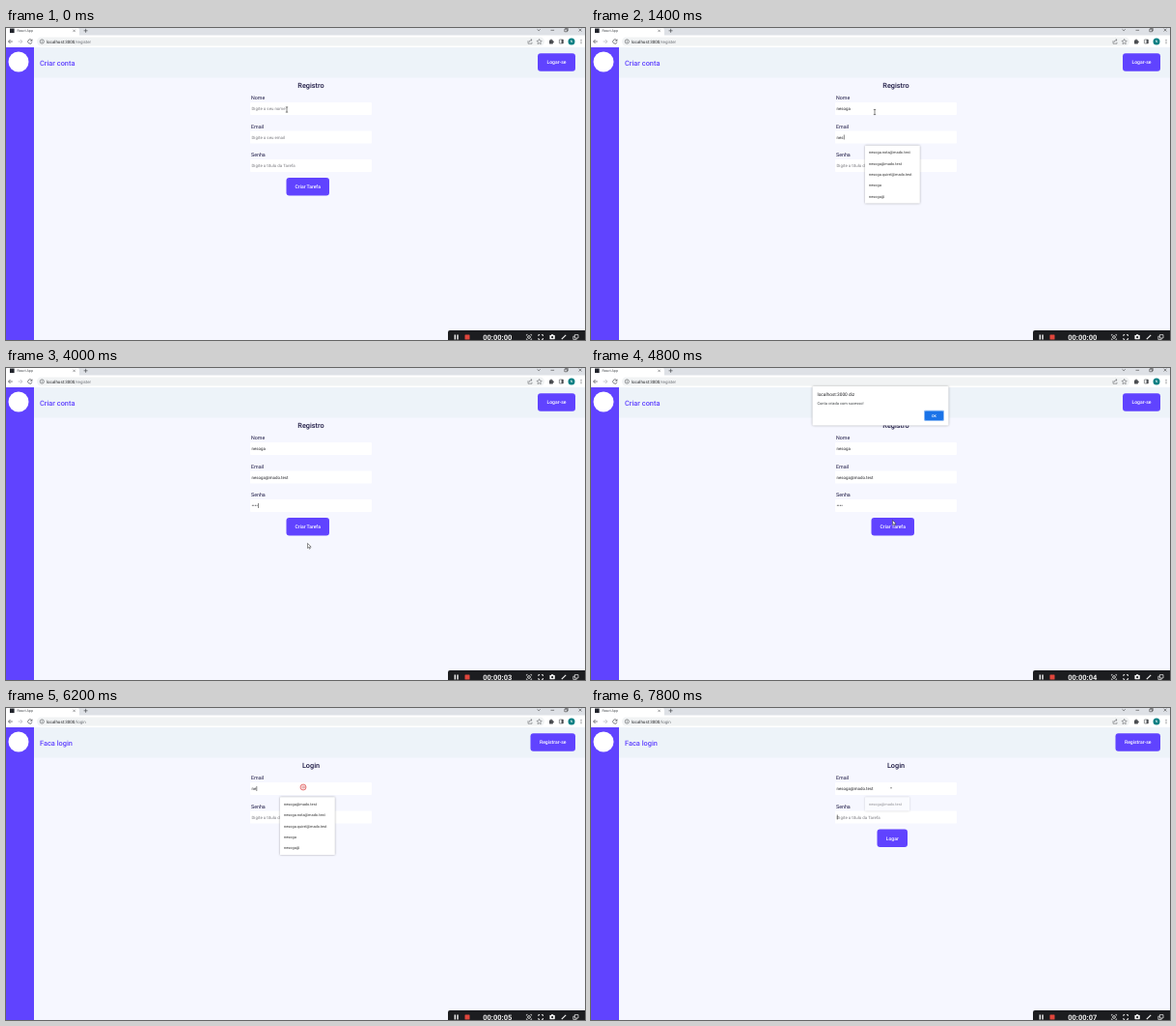
Animation of 600 by 323 pixels, one loop 8 s. Source, as an HTML page:

```html
<!DOCTYPE html>
<html lang="pt">
<head>
<meta charset="utf-8">
<title>Criar conta</title>
<style>
  html, body { margin: 0; width: 100%; height: 100%; overflow: hidden; background: #f6f7ff; }
  svg { display: block; width: 100vw; height: 100vh; }
  text { font-family: Roboto, sans-serif; text-rendering: geometricPrecision; white-space: pre; }
  .shadow { filter: drop-shadow(0 .6px 1px #0005); }
</style>
</head>
<body>
<svg id="stage" viewBox="0 0 600 323" preserveAspectRatio="none"></svg>
<script>
const LOOP = 8000, STEP = 200;
const PURPLE = '#6043ff', INK = '#1c1842', ICON = '#4a4d51';
const NAME = 'nesoga', EMAIL = 'nesoga@mado.test';
const OTHER = 'nesoga.nota@mado.test';
const REST = ['nesoga.quirel@mado.test', NAME, NAME + '@'];
const FIELD_SIZE = 4.38, LIST_SIZE = 3.92;

const stage = document.getElementById('stage');
const ruler = document.createElement('canvas').getContext('2d');
function measure(str, size) {
  ruler.font = '100px Roboto, sans-serif';
  return ruler.measureText(str).width * size / 100;
}

const rect = (x, y, w, h, fill, r = 0, extra = '') =>
  `<rect x="${x}" y="${y}" width="${w}" height="${h}" rx="${r}" fill="${fill}" ${extra}/>`;
const circle = (x, y, r, fill, extra = '') =>
  `<circle cx="${x}" cy="${y}" r="${r}" fill="${fill}" ${extra}/>`;
const line = (d, color = ICON, width = .7) =>
  `<path d="${d}" fill="none" stroke="${color}" stroke-width="${width}"/>`;
const text = (x, y, str, size, fill = INK, weight = 400, anchor = 'start') =>
  `<text x="${x}" y="${y}" font-size="${size}" fill="${fill}" font-weight="${weight}" text-anchor="${anchor}">${str}</text>`;
const at = (x, y, content) => `<g transform="translate(${x} ${y})">${content}</g>`;

function button(x, y, w, label) {
  return rect(x, y, w, 18.5, PURPLE, 3) + text(x + w / 2, y + 11, label, 5.05, '#fff', 500, 'middle');
}

function browser(path) {
  const host = 'localhost:3000';
  return rect(0, 0, 600, 8, '#dee1e6') + rect(0, 0, 76, 9, '#fff', 1.5) + rect(0, 7.5, 600, 12.5, '#fff')
    + rect(4, .5, 4.6, 4.6, '#20232a') + text(11.5, 4.4, 'React App', 3.6, '#45494d')
    + line('M69.4 1.7l2.4 2.4m0-2.4l-2.4 2.4', ICON, .5) + line('M80.6 2.8h4M82.6.8v4')
    + line('M550.5 1.3l1.6 1.5 1.6-1.5M564.5 2.3h3.6M578.8 1.2h2.6v2.6h-2.6zM579.7 1.2V.4h2.6V3h-.9M593.6.7l2.8 2.8m0-2.8l-2.8 2.8', '#333', .55)
    + line('M6.8 14H2.6M4.6 11.9L2.5 14l2.1 2.1')
    + line('M12.6 14h4.2M14.8 11.9l2.1 2.1-2.1 2.1', '#b5b8bc')
    + line('M26.6 12.6a2.2 2.2 0 1 0 .4 2M27 11.6v1.7h-1.7')
    + rect(32, 9.4, 526, 9.2, '#f1f3f4', 4.6)
    + circle(37.3, 14, 2.1, 'none', `stroke="${ICON}" stroke-width=".55"`) + line('M37.3 13.6v1.5M37.3 12.6v.5', ICON, .5)
    + text(42, 15.6, host, 4.45, '#202124')
    + text(42 + measure(host, 4.45), 15.6, path, 4.45, '#6b6f74')
    + line('M541 13.2v3h4v-1.4M542 14.8q.3-2.4 2.8-2.4M543.8 11.2l1.3 1.2-1.3 1.2', ICON, .5)
    + line('M552.6 11.5l.8 1.7 1.8.2-1.3 1.3.3 1.9-1.6-.9-1.6.9.3-1.9-1.3-1.3 1.8-.2z', ICON, .5)
    + rect(563, 12.6, 3.9, 3.8, ICON, .4) + circle(565, 12.3, .8, ICON) + circle(567, 14.4, .8, ICON)
    + rect(573.4, 12, 4, 4, 'none', .3, `stroke="${ICON}" stroke-width=".6"`) + rect(575.6, 12, 1.8, 4, ICON)
    + circle(586, 14, 3.5, '#087f83') + text(586, 15.3, 'N', 3.5, '#fff', 400, 'middle')
    + [12.2, 14, 15.8].map(y => circle(596, y, .5, ICON)).join('');
}

function recorder(t) {
  const seconds = Math.max(0, Math.floor((t - 420) / 990));
  const white = '#f4f4f4';
  return rect(458, 313, 146, 14, '#1c1d20', 2)
    + rect(464.6, 317.5, 1.4, 5, white) + rect(467.3, 317.5, 1.4, 5, white)
    + rect(475.5, 317.5, 5, 5, '#e0463c', .5)
    + text(509.3, 322.8, '00:00:0' + seconds, 7.5, white, 700, 'middle')
    + circle(542, 320, 1.4, 'none', `stroke="${white}" stroke-width=".8"`)
    + line('M539.4 318.6v-1.2h1.2M543.4 317.4h1.2v1.2M544.6 321.4v1.2h-1.2M540.6 322.6h-1.2v-1.2', white)
    + line('M551.8 319v-1.4h1.4M555 317.6h1.4v1.4M556.4 321v1.4H555M553.2 322.4h-1.4V321', white, .9)
    + rect(563.4, 318, 5.4, 4.2, white, .6) + rect(565, 317.2, 2.2, 1.5, white) + circle(566.1, 320.1, 1.1, '#1c1d20')
    + line('M575.8 322.2l4.4-4.4', white, 1.2)
    + line('M589.4 317.6h3.6v3.4h-3.6zM589.4 319.2h-1.6v3.2h3.4V321', white);
}

function field(y, label, placeholder, value, focused) {
  const size = value.startsWith('•') ? 4.8 : FIELD_SIZE;
  const caretX = 254.9 + measure(value, size);
  return text(254, y - 2.7, label, 5.3)
    + rect(253, y, 126, 13, '#fff', 1)
    + text(254.5, y + 8, value || placeholder, size, value ? '#26262b' : '#7b7b80')
    + (focused ? rect(caretX, y + 4, .5, 5, '#111') : '');
}

function suggestions(y, value, items, opacity = 1) {
  const matches = items.filter(item => value && item.startsWith(value));
  if (!matches.length) return '';
  const width = Math.max(...matches.map(item => measure(item, LIST_SIZE))) + 12;
  return `<g opacity="${opacity}">`
    + rect(284, y, width, matches.length * 11.4 + 2.8, '#fff', .6, 'class="shadow"')
    + matches.map((item, i) => text(288, y + 8.4 + i * 11.4, item, LIST_SIZE, '#333')).join('') + '</g>';
}

function layout(heading, title, topButton, content) {
  return rect(0, 20, 600, 303, '#f6f7ff') + rect(29, 20, 571, 31.5, '#edf3f9')
    + rect(0, 20, 29, 303, PURPLE) + circle(13, 35, 10.5, '#fff')
    + text(35, 38.6, heading, 7.4, PURPLE, 500) + topButton
    + text(316, 61.6, title, 7.3, INK, 500, 'middle') + content;
}

const typed = (str, t, start, perChar) => str.slice(0, Math.max(0, Math.floor((t - start) / perChar)));

function registerPage(t) {
  const name = typed(NAME, t, 200, 125);
  const email = typed(EMAIL, t, 1000, 125);
  const password = typed('••••', t, 3200, 200);
  const items = [OTHER, EMAIL, ...REST];
  const focus = t < 200 || t >= 4400 ? '' : t < 1200 ? 'name' : t < 3200 ? 'email' : 'password';
  return layout('Criar conta', 'Registro', button(551, 26.3, 39, 'Logar-se'),
    field(77, 'Nome', 'Digite o seu nome', name, focus === 'name')
    + field(106.5, 'Email', 'Digite o seu email', email, focus === 'email')
    + field(136, 'Senha', 'Digite o titulo da Tarefa', password, focus === 'password')
    + button(290.5, 155, 44.5, 'Criar Tarefa')
    + (focus === 'name' ? suggestions(92.3, name, items) : '')
    + (focus === 'email' ? suggestions(121.8, email, items) : '')
    + (t === 3200 ? suggestions(121.8, email, items, .5) : ''));
}

function loginPage(t) {
  const email = typed(EMAIL, t, 6000, 100);
  const done = t >= 7800;
  return layout('Faca login', 'Login', button(543.5, 26.3, 46.5, 'Registrar-se'),
    field(77, 'Email', 'Digite o seu email', email, t >= 6000 && !done)
    + field(106.5, 'Senha', 'Digite o titulo da Tarefa', '', done)
    + button(296.5, 125.5, 31.5, 'Logar')
    + suggestions(92.3, email, [EMAIL, OTHER, ...REST], done ? .5 : 1));
}

function alertBox() {
  return rect(229.5, 19, 141, 40.5, '#fff', 1, 'class="shadow"')
    + text(234.5, 28.8, 'localhost:3000 diz', 4.75, '#202124')
    + text(234.5, 38, 'Conta criada com sucesso!', 3.97, '#3c4043')
    + rect(345, 43.7, 21, 11.3, '#8bb8f3', 1.4) + rect(346, 44.7, 19, 9.3, '#1a73e8', 1)
    + text(355.5, 50.8, 'OK', 3.8, '#fff', 500, 'middle');
}

const CURSORS = {
  beam: line('M-1.2-2.6h2.4M0-2.6v5.2M-1.2 2.6h2.4', '#333', .6),
  arrow: '<path d="M-.5-2.5v5l1.2-1 .8 1.8.8-.4-.8-1.7h1.7z" fill="#fff" stroke="#222" stroke-width=".5"/>',
  hand: '<path d="M-.8-2.6q.8-.7 1 .2v2l2 .5v2l-.7 1.5h-2.3l-1.6-2.4q.2-.8 1.2 0z" fill="#fff" stroke="#111" stroke-width=".5"/>',
  ring: circle(0, 0, 3, '#f9d5d5', 'stroke="#e05252" stroke-width=".7"') + line('M-1.2 0h3.6', '#b66', .6),
  dot: line('M-1-.4h2M0-.4v1', '#777', .6)
};
// time, x, y, shape from that time on
const POINTER = [
  [0, 291, 84.5, 'beam'], [600, 294, 87, 'beam'], [3200, 294, 87, 'beam'], [3400, 300, 118, 'arrow'],
  [4000, 313, 184, 'arrow'], [4400, 313, 167, 'ring'], [4600, 313, 167, 'hand'], [4800, 313, 160, 'arrow'],
  [5400, 351, 54.5, 'hand'], [5600, 351, 54.5, 'hand'], [5800, 325, 72, 'arrow'], [6000, 308, 82, 'ring'],
  [6200, 308, 82, 'ring'], [6400, 311, 83, 'dot'], [LOOP, 311, 83, 'dot']
];
function pointer(t) {
  const i = POINTER.findIndex(key => key[0] > t) - 1;
  const [t0, x0, y0, shape] = POINTER[i], [t1, x1, y1] = POINTER[i + 1];
  const k = (t - t0) / (t1 - t0);
  return at(x0 + (x1 - x0) * k, y0 + (y1 - y0) * k, CURSORS[shape]);
}

function draw(t) {
  const login = t >= 5800;
  stage.innerHTML = (login ? loginPage(t) : registerPage(t))
    + browser(login ? '/login' : '/register')
    + (t >= 4800 && !login ? alertBox() : '')
    + recorder(t) + pointer(t);
}

const start = performance.now();
let shown = -1;
function tick() {
  const t = Math.floor((performance.now() - start) % LOOP / STEP) * STEP;
  if (t !== shown) draw(shown = t);
  requestAnimationFrame(tick);
}
tick();
</script>
</body>
</html>
```
